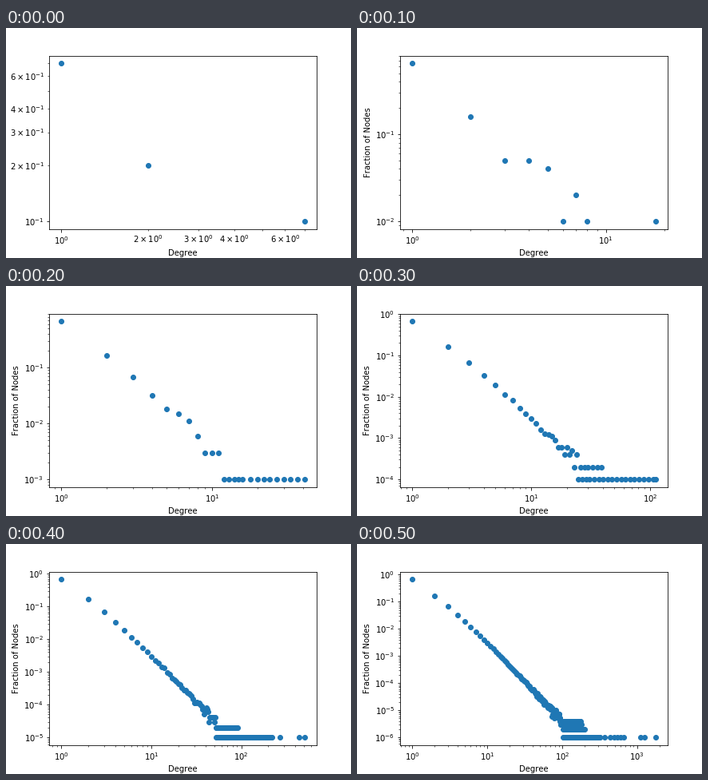
Write a matplotlib script that moves like this. It is 432 px wide and 288 px high and loops after 600 ms.

```python
import math
import numpy as np
import matplotlib.pyplot as plt
from matplotlib.animation import FuncAnimation

# Classic text spacing, kerning rounded to whole pixels.
plt.rcParams["text.kerning_factor"] = 6


def expected(degree, nodes):
    """Mean node count per degree in a preferential-attachment tree."""
    return 4 * nodes / (degree * (degree + 1) * (degree + 2))


def spread(first, last, growth):
    """Degrees from first to last with gaps proportional to the degree."""
    degree = first
    while degree < last:
        yield degree
        degree += max(1, int(growth * degree))
    yield last


def histogram(nodes, head, floor, growth, rows, hubs=()):
    """Noisy power law up to head, then rows of degrees seen 1, 2, 3... times."""
    rng = np.random.default_rng(nodes)
    counts = dict.fromkeys(hubs, 1)
    for k in range(1, head + 1):
        mean = expected(k, nodes)
        noise = 0.5 * math.sqrt(mean) * rng.normal() if k > 3 else 0
        counts[k] = max(floor, round(mean + noise))
    for count, (first, last) in enumerate(rows, 1):
        for k in spread(first, last, growth):
            counts.setdefault(k, count)
    return counts


histograms = [
    {1: 7, 2: 2, 7: 1},
    {1: 65, 2: 16, 3: 5, 4: 5, 5: 4, 6: 1, 7: 2, 8: 1, 18: 1},
    histogram(10**3, head=11, floor=3, growth=0.13, rows=[(12, 41)]),
    histogram(10**4, head=24, floor=2, growth=0.1, rows=[(25, 111), (26, 40)]),
    histogram(10**5, head=51, floor=3, growth=0.04,
              rows=[(53, 219), (52, 93)], hubs=[269, 439, 503]),
    histogram(10**6, head=101, floor=3, growth=0.04,
              rows=[(102, 321), (103, 203), (104, 181), (105, 178), (107, 119)],
              hubs=[371, 440, 498, 549, 600, 659, 1119, 1262, 1750]),
]

fig, ax = plt.subplots(figsize=(6, 4), dpi=72)
fig.subplots_adjust(left=0.125, right=0.9, bottom=0.125, top=0.88)


def draw(frame):
    counts = histograms[frame]
    nodes = 10 ** (frame + 1)
    degrees = sorted(counts)
    ax.clear()
    ax.loglog(degrees, [counts[k] / nodes for k in degrees], "o", color="tab:blue")
    ax.set_xlabel("Degree")
    ax.set_ylabel("Fraction of Nodes")


animation = FuncAnimation(fig, draw, frames=len(histograms), interval=100,
                          init_func=lambda: draw(0), repeat=True)
plt.show()
```
